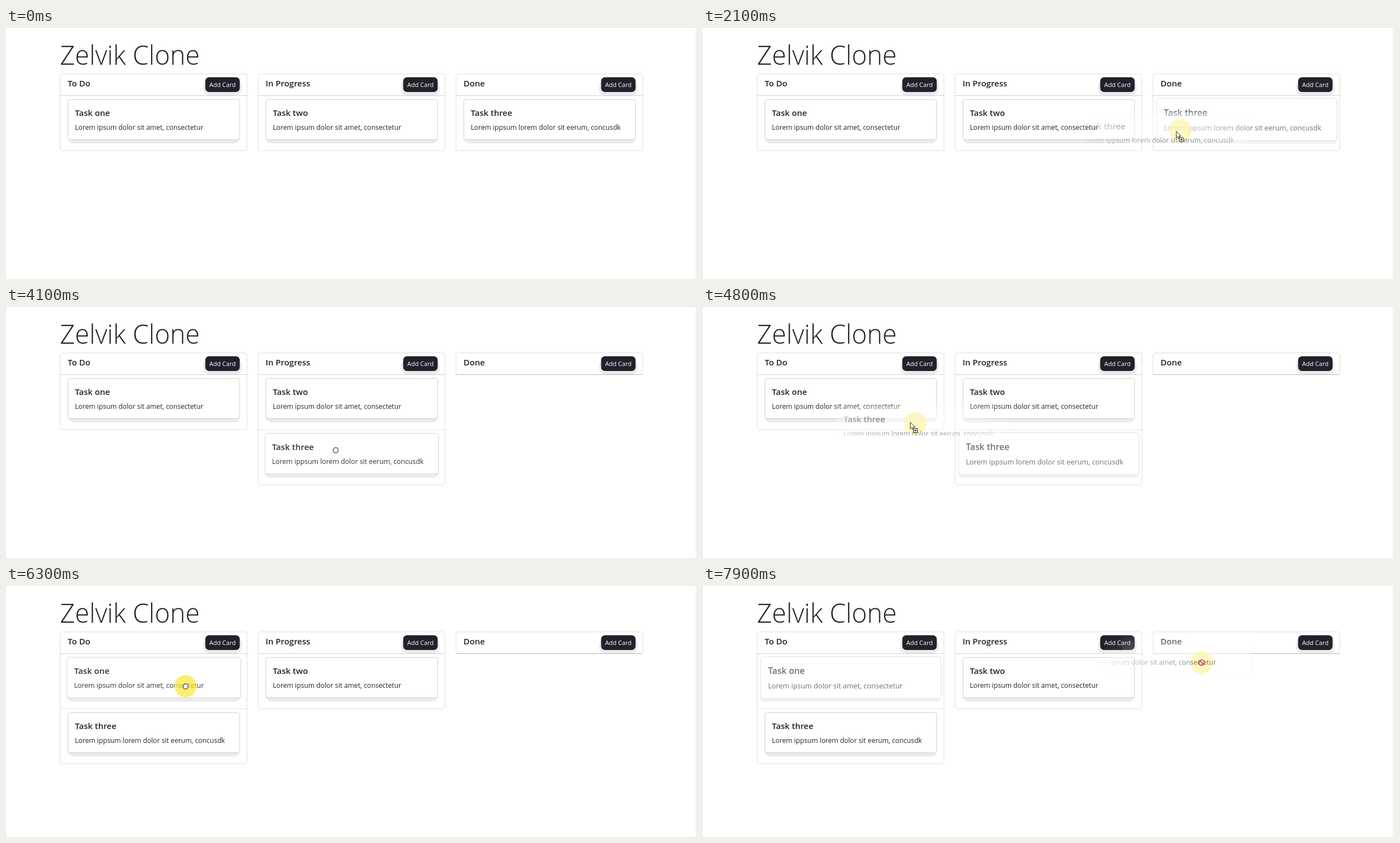
These frames come from a looping animation (1243x451 px, 8000 ms). An HTML page:

```html
<!DOCTYPE html>
<html lang="en">
<head>
<meta charset="utf-8">
<title>Task board</title>
<style>
  :root { --t: 0ms; }
  html, body { margin: 0; width: 100%; height: 100%; overflow: hidden; background: #fff; }
  svg { display: block; width: 1243px; height: 451px; }
  text { font-family: "Open Sans", "Noto Sans", sans-serif; fill: #212529; }
  .title { font-size: 47px; font-weight: 300; }
  .head { font-size: 15px; font-weight: 600; }
  .body { font-size: 12.23px; }
  .label { font-size: 11px; fill: #fff; }
  .list { fill: none; stroke: rgb(0 0 0 / .125); }
  .rule { stroke: rgb(0 0 0 / .18); }
  .divider { stroke: #e0e8ec; }
  .face { fill: #fff; stroke: var(--edge, #d0d0d0); }
  .shade { fill: var(--shade, #ebebeb); }
  .ghost { --edge: #ececec; --shade: none; mask: url(#glow); }
  .icon { fill: #fff; stroke: #111; }
  .spot { fill: #fce83a; fill-opacity: .7; }

  /* Every animation is paused; the clock below moves it through its delay. */
  .anim { animation: 8s linear var(--t) infinite paused; }
  .step { animation-timing-function: step-end; }

  .follow { animation-name: follow; }
  .lag { animation-delay: calc(var(--t) + 20ms); }
  @keyframes follow {
    0%, 7.5% { transform: translate(801px, 271px); }
    11.25% { transform: translate(940px, 205px); }
    13.125% { transform: translate(1006px, 165px); }
    15%, 21.25% { transform: translate(994px, 161px); }
    28.75% { transform: translate(780px, 198px); }
    33.75%, 45% { transform: translate(691px, 206px); }
    48.75%, 53.75% { transform: translate(593px, 257px); }
    60% { transform: translate(373px, 207px); }
    63.75%, 72.5% { transform: translate(362px, 204px); }
    76.25%, 81.25% { transform: translate(323px, 180px); }
    88.75% { transform: translate(880px, 115px); }
    93.75% { transform: translate(902px, 110px); }
    97.5%, 100% { transform: translate(897px, 137.5px); }
  }

  /* Lists grow and shrink on each drop */
  .todo-list { animation-name: todo-list; }
  .progress-list { animation-name: progress-list; }
  .done-list { animation-name: done-list; }
  @keyframes todo-list { 0% { height: 138px; } 65.625%, 100% { height: 237px; } }
  @keyframes progress-list { 0%, 65.625%, 100% { height: 138px; } 38.125% { height: 237px; } }
  @keyframes done-list { 0% { height: 138px; } 38.125%, 100% { height: 39px; } }

  /* Cards swell and pale while held */
  .todo-one { animation-name: todo-one; }
  .todo-three { animation-name: todo-three; }
  .progress-three { animation-name: progress-three; }
  .done-three { animation-name: done-three; }
  .todo-one, .todo-three, .progress-three, .done-three { animation-timing-function: ease; }
  @keyframes todo-one {
    0%, 78.125% { transform: scale(1); opacity: 1; }
    81.875%, 100% { transform: scale(1.05); opacity: .65; }
  }
  @keyframes done-three {
    0%, 20.625% { transform: scale(1); opacity: 1; }
    24.375%, 38.12% { transform: scale(1.05); opacity: .65; }
    38.125%, 100% { transform: scale(1.05); opacity: 0; }
  }
  @keyframes progress-three {
    0%, 38.12% { transform: scale(1.05); opacity: 0; }
    38.125% { transform: scale(1.05); opacity: .65; }
    41.875%, 50.625% { transform: scale(1); opacity: 1; }
    54.375%, 65.62% { transform: scale(1.05); opacity: .65; }
    65.625%, 100% { transform: scale(1.05); opacity: 0; }
  }
  @keyframes todo-three {
    0%, 65.62% { transform: scale(1.05); opacity: 0; }
    65.625% { transform: scale(1.05); opacity: .65; }
    69.375%, 100% { transform: scale(1); opacity: 1; }
  }

  /* Things that switch on and off */
  .arrow-on { animation-name: arrow-on; }
  .hand-on { animation-name: hand-on; }
  .spot-on { animation-name: spot-on; }
  .drag-a { animation-name: drag-a; }
  .drag-b { animation-name: drag-b; }
  .drag-c { animation-name: drag-c; }
  .copy-on { animation-name: copy-on; }
  .barred-on { animation-name: barred-on; }
  .todo-divider { animation-name: todo-divider; }
  .progress-divider { animation-name: progress-divider; }
  @keyframes arrow-on { 0%, 12.5%, 47.5%, 75%, 100% { opacity: 0; } 3.75%, 38.125%, 65.625% { opacity: 1; } }
  @keyframes hand-on { 0%, 23.75%, 53.75%, 81.25%, 100% { opacity: 0; } 12.5%, 47.5%, 75% { opacity: 1; } }
  @keyframes spot-on { 0%, 38.125%, 65.625% { opacity: 0; } 20%, 51.875%, 78.125%, 100% { opacity: 1; } }
  @keyframes drag-a { 0%, 38.125%, 100% { opacity: 0; } 23.75% { opacity: 1; } }
  @keyframes drag-b { 0%, 65.625%, 100% { opacity: 0; } 53.75% { opacity: 1; } }
  @keyframes drag-c { 0% { opacity: 0; } 81.25%, 100% { opacity: 1; } }
  @keyframes copy-on { 0% { opacity: 1; } 96.25%, 100% { opacity: 0; } }
  @keyframes barred-on { 0% { opacity: 0; } 96.25%, 100% { opacity: 1; } }
  @keyframes todo-divider { 0% { opacity: 0; } 65.625%, 100% { opacity: 1; } }
  @keyframes progress-divider { 0%, 65.625%, 100% { opacity: 0; } 38.125% { opacity: 1; } }
</style>
</head>
<body>
<svg viewBox="0 0 1243 451">
  <defs>
    <g id="blank">
      <rect class="shade" x="-155" y="-24" width="310" height="67" rx="10"/>
      <rect class="face" x="-154.5" y="-36" width="309" height="72" rx="4"/>
    </g>
    <g id="one">
      <use href="#blank"/>
      <text class="head" x="-142" y="-6.5">Task one</text>
      <text class="body" x="-142" y="18.2">Lorem ipsum dolor sit amet, consectetur</text>
    </g>
    <g id="two">
      <use href="#blank"/>
      <text class="head" x="-142" y="-6.5">Task two</text>
      <text class="body" x="-142" y="18.2">Lorem ipsum dolor sit amet, consectetur</text>
    </g>
    <g id="three">
      <use href="#blank"/>
      <text class="head" x="-142" y="-6.5">Task three</text>
      <text class="body" x="-142" y="18.2">Lorem ippsum lorem dolor sit eerum, concusdk</text>
    </g>
    <g id="header">
      <path class="rule" d="M97.5 121.5H433.5"/>
      <rect x="355" y="94" width="69" height="27" rx="10" fill="#ebebed"/>
      <rect x="358.5" y="88.5" width="62" height="26.5" rx="7" fill="#20212a"/>
      <text class="label" x="389.5" y="106" text-anchor="middle">Add Card</text>
    </g>
    <path id="arrow" class="icon" stroke-width=".9" d="M0 0V12L2.8 9.4 4.8 13.6 6.6 12.8 4.7 8.8H8.6Z"/>
    <path id="hand" class="icon" d="M-2.4 5Q-4.6 2.8-4.6 0-4.6-2-3-2-3-4.6-1-4 0-5.2 1.2-4 3-4.6 3.2-3 4.8-3 4.6-.5 4.6 3 2.6 5Z"/>
    <g id="copy">
      <use href="#arrow"/>
      <path class="icon" d="M5.5 11.5h7v7h-7zM9 13v4M7 15h4"/>
    </g>
    <path id="barred" fill="#fff" stroke="#c2183a" stroke-width="1.6" d="M-4.8 0a4.8 4.8 0 1 0 9.6 0a4.8 4.8 0 1 0-9.6 0M-3.4-3.4 3.4 3.4"/>
    <clipPath id="cell"><rect x="-168" y="-42" width="336" height="85"/></clipPath>
    <radialGradient id="fade" gradientUnits="userSpaceOnUse" cx="0" cy="0" r="1" gradientTransform="scale(192 75)">
      <stop offset="0" stop-color="#fff" stop-opacity=".62"/>
      <stop offset=".5" stop-color="#fff" stop-opacity=".36"/>
      <stop offset="1" stop-color="#fff" stop-opacity="0"/>
    </radialGradient>
    <mask id="glow" maskUnits="userSpaceOnUse" x="-210" y="-80" width="420" height="104">
      <rect x="-210" y="-80" width="420" height="104" fill="url(#fade)"/>
    </mask>
  </defs>

  <path d="M1241.5 0V451" stroke="#e6e6e6"/>
  <text class="title" x="97" y="66">Zelvik Clone</text>

  <g>
    <rect class="list anim step todo-list" x="97.5" y="82.5" width="336" height="138" rx="4"/>
    <use href="#header"/>
    <text class="head" x="111" y="105">To Do</text>
    <path class="divider anim step todo-divider" d="M98 220.5H433"/>
  </g>
  <g transform="translate(356)">
    <rect class="list anim step progress-list" x="97.5" y="82.5" width="336" height="138" rx="4"/>
    <use href="#header"/>
    <text class="head" x="111" y="105">In Progress</text>
    <path class="divider anim step progress-divider" d="M98 220.5H433"/>
  </g>
  <g transform="translate(712)">
    <rect class="list anim step done-list" x="97.5" y="82.5" width="336" height="138" rx="4"/>
    <use href="#header"/>
    <text class="head" x="111" y="105">Done</text>
  </g>

  <g transform="translate(266 164.5)" clip-path="url(#cell)"><use class="anim todo-one" href="#one"/></g>
  <g transform="translate(266 263.5)" clip-path="url(#cell)"><use class="anim todo-three" href="#three"/></g>
  <use href="#two" transform="translate(622 164.5)"/>
  <g transform="translate(622 263.5)" clip-path="url(#cell)"><use class="anim progress-three" href="#three"/></g>
  <g transform="translate(978 164.5)" clip-path="url(#cell)"><use class="anim done-three" href="#three"/></g>

  <g class="anim follow lag"><circle class="spot anim step spot-on" r="20"/></g>

  <g class="anim follow">
    <use class="anim step arrow-on" href="#arrow"/>
    <use class="anim step hand-on" href="#hand"/>
    <g class="anim step drag-a">
      <g class="ghost"><use href="#three" x="-24" y="2.5"/></g>
      <use href="#copy"/>
    </g>
    <g class="anim step drag-b">
      <g class="ghost"><use href="#three" x="22" y="6.5"/></g>
      <use href="#copy"/>
    </g>
    <g class="anim step drag-c">
      <g class="ghost"><use href="#one" x="-63" y="-14.5"/></g>
      <use class="anim step copy-on" href="#copy"/>
      <use class="anim step barred-on" href="#barred"/>
    </g>
  </g>
</svg>
<script>
  const LOOP = 8000, TICK = 100;
  function run() {
    const time = Math.floor(performance.now() % LOOP / TICK) * TICK;
    document.documentElement.style.setProperty('--t', `${-time}ms`);
    requestAnimationFrame(run);
  }
  run();
</script>
</body>
</html>
```
